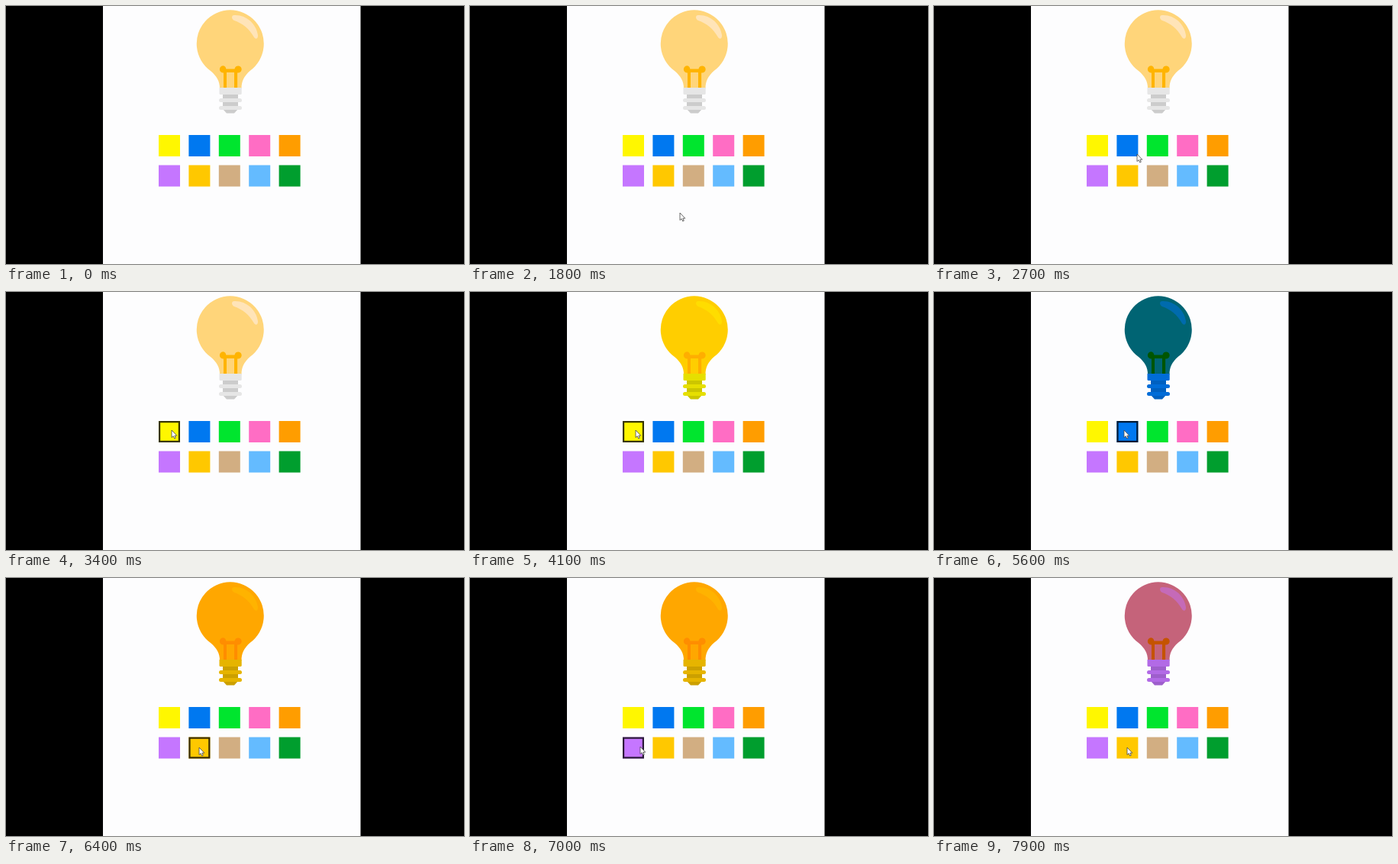
Write an HTML page that moves like this. It is 600 by 338 pixels and loops after 8 s.

```html
<!DOCTYPE html>
<html lang="en">
<head>
<meta charset="utf-8">
<title>Bulb colour picker</title>
<style>
html, body { margin: 0; width: 100%; height: 100%; overflow: hidden; background: #000; }
svg { display: block; width: 100%; height: 100%; }
</style>
</head>
<body>
<svg viewBox="0 0 600 338">
  <rect width="600" height="338"/>
  <rect x="127" width="337.5" height="338" fill="#fdfdfe"/>
  <g id="bulb">
    <path data-base="255 213 122" d="M280 108C280 98 276 92 268 85A44 44 0 1 1 319.5 85C312 92 308.5 98 308.5 108Z"/>
    <path data-base="255 228 184" d="M299 12C314 11 328 23 330 38C330.5 43 327 44 325 41C318 29 310 23 299 19C295 17 295 12 299 12Z"/>
    <path data-base="255 180 0" d="M284 78.3a4.6 4.6 0 0 1 4.3 4.2H299.5a4.6 4.6 0 1 1 3.6 5V107H299V87H289V107H285V87.5A4.6 4.6 0 1 1 284 78.3Z"/>
    <path data-base="204 204 204" d="M284 115H304V135L299 140.5H289L284 135Z"/>
    <path data-base="230 230 230" d="M279.5 107H308.7V114.5Q308.7 116 307 116H281Q279.5 116 279.5 114.5Z"/>
    <rect data-base="230 230 230" x="279" y="121" width="30" height="5" rx="2.5"/>
    <rect data-base="230 230 230" x="279" y="131" width="30" height="5" rx="2.5"/>
  </g>
  <g id="swatches"></g>
  <rect id="border" width="25.8" height="25.8" fill="none" stroke="#000" stroke-opacity=".78" stroke-width="2.2"/>
  <path id="cursor" d="M0 0V9.6L2.2 7.7L3.7 11L5.3 10.3L3.9 7.2H6.8Z" fill="#fff" stroke="#444" stroke-width=".8" stroke-linejoin="round"/>
</svg>
<script>
const LOOP = 8000, STEP = 100;
const WHITE = [255, 255, 255];
const COLORS = [
  [255, 247, 0], [0, 120, 240], [0, 229, 46], [255, 109, 196], [255, 157, 0],
  [197, 118, 255], [255, 200, 0], [210, 174, 130], [100, 187, 255], [0, 158, 46]
];
const YELLOW = 0, BLUE = 1, PURPLE = 5, GOLD = 6, NONE = -1;

// [time, value]: each value holds until the next entry
const clicks = [[0, NONE], [3600, YELLOW], [5200, BLUE], [6300, GOLD], [7200, PURPLE]];
const hovers = [[0, NONE], [3200, YELLOW], [4700, NONE], [4900, BLUE], [5900, NONE],
  [6100, GOLD], [6700, NONE], [6900, PURPLE], [7700, NONE]];

// [time, x, y]
const path = [[1500, 284, 283], [1800, 275, 271], [2700, 266, 194], [3300, 217, 181],
  [4500, 217, 181], [5000, 249, 181], [5700, 249, 181], [6200, 253, 222],
  [6500, 253, 222], [6900, 223, 221], [7500, 223, 221], [7900, 253, 222]];

const byId = id => document.getElementById(id);
const parts = [...byId("bulb").children].map(node => ({
  node, base: node.dataset.base.split(" ").map(Number)
}));
const border = byId("border"), cursor = byId("cursor");

const rgb = c => `rgb(${c.map(Math.round)})`;
const corner = i => [200 + (i % 5) * 39.4, 169 + Math.floor(i / 5) * 39.5];
const latest = (list, t) => list.filter(e => e[0] <= t).pop();
const ease = p => p * p * (3 - 2 * p);

COLORS.forEach((color, i) => {
  const [x, y] = corner(i);
  const rect = document.createElementNS("http://www.w3.org/2000/svg", "rect");
  Object.entries({ x, y, width: 28, height: 28, fill: rgb(color) })
    .forEach(([key, value]) => rect.setAttribute(key, value));
  byId("swatches").append(rect);
});

function cursorAt(t) {
  const next = path.findIndex(p => p[0] > t);
  if (next < 0) return path[path.length - 1].slice(1);
  const [t0, x0, y0] = path[next - 1], [t1, x1, y1] = path[next];
  const p = ease((t - t0) / (t1 - t0));
  return [x0 + (x1 - x0) * p, y0 + (y1 - y0) * p];
}

function render(t) {
  const tint = COLORS[latest(clicks, t)[1]] || WHITE;
  for (const { node, base } of parts) {
    node.setAttribute("fill", rgb(base.map((v, i) => v * tint[i] / 255)));
  }

  const hovered = latest(hovers, t)[1];
  border.setAttribute("visibility", hovered === NONE ? "hidden" : "visible");
  if (hovered !== NONE) {
    const [x, y] = corner(hovered);
    border.setAttribute("x", x + 1.1);
    border.setAttribute("y", y + 1.1);
  }

  const shown = t >= path[0][0];
  cursor.setAttribute("visibility", shown ? "visible" : "hidden");
  if (shown) cursor.setAttribute("transform", `translate(${cursorAt(t)})`);
}

const start = performance.now();
function tick() {
  const t = (performance.now() - start) % LOOP;
  render(Math.floor(t / STEP) * STEP);
  requestAnimationFrame(tick);
}
tick();
</script>
</body>
</html>
```
